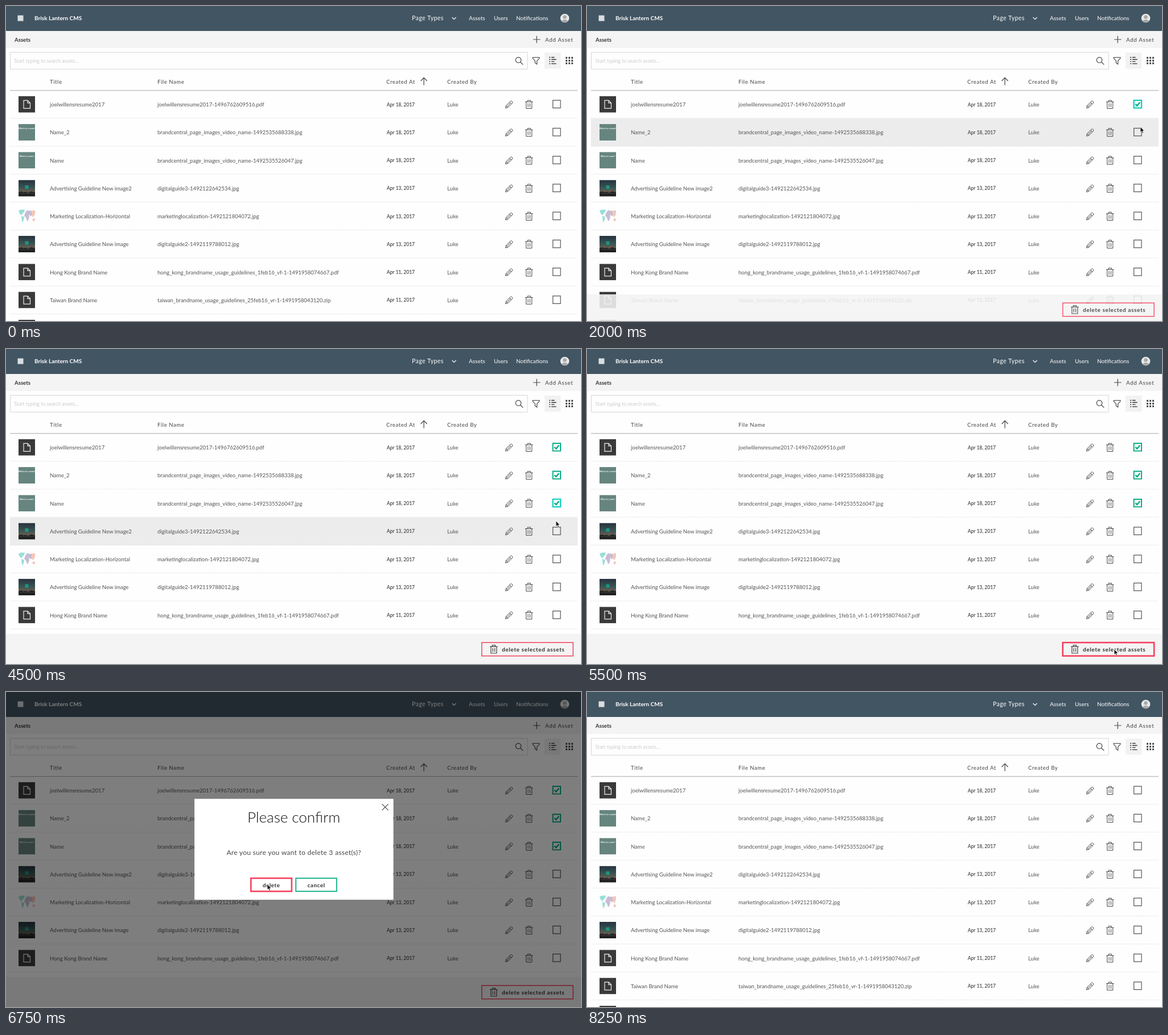
An HTML page for the animation above (9000 ms loop, 1010 by 555 pixels).

```html
<!DOCTYPE html>
<html lang="en">
<head>
<meta charset="utf-8">
<title>Assets</title>
<style>
html, body { margin: 0; width: 100%; height: 100%; overflow: hidden; background: #fefefe; }
svg { display: block; width: 1010px; height: 555px; font: 9.5px Lato, sans-serif; fill: #444; }
.line { fill: none; stroke: #444; stroke-width: 1.2; }
.thin { stroke-width: 1; }
.nav { font-size: 10px; fill: #fff; }
.wide { letter-spacing: .6px; }
.bold { font-weight: 700; fill: #333; }
.row { fill: #555; }
.date { font-size: 8.5px; font-weight: 600; fill: #444; }
.btn { font-size: 10px; letter-spacing: .45px; }
.red { fill: none; stroke: #f5405c; }
.green { fill: none; stroke: #01a982; }
.hover { fill: none; }
.hover.on { fill: #ececec; }
.box { fill: none; stroke: #555; stroke-width: 1.2; }
.tick { fill: none; stroke: #01a982; stroke-width: 2.4; display: none; }
.checked .box { stroke: #01a982; stroke-width: 1.9; }
.checked.focus .box { stroke: #16cfc0; stroke-width: 2.3; }
.checked .tick { display: inline; }
</style>
</head>
<body>
<svg viewBox="0 0 1010 555">
  <defs>
    <linearGradient id="night" x2="0" y2="1">
      <stop offset="0" stop-color="#27323f"/>
      <stop offset=".4" stop-color="#35504f"/>
      <stop offset=".6" stop-color="#4d5a52"/>
      <stop offset=".72" stop-color="#5b5048"/>
      <stop offset="1" stop-color="#25282b"/>
    </linearGradient>
    <clipPath id="frame"><path d="M0 0h29v29H0z"/></clipPath>
    <clipPath id="face"><circle cx="981.5" cy="21.5" r="7.8"/></clipPath>
    <g id="trash">
      <path d="M-6.8-4.7H6.8M-2.6-4.7V-7.2H2.6V-4.7M-5-4.7V7H5V-4.7M-1.7-2V4.5M1.7-2V4.5"/>
    </g>
    <g id="pencil">
      <path d="M-6.3 6.6l1-4.2 7.7-7.8q1.3-1.2 2.5 0l.7.7q1.2 1.2 0 2.5l-7.7 7.7zM.8-3.8l3.2 3.2M-5.3 2.4l3.1 3.1M-3.4 3.7L2.5-2.2"/>
    </g>
    <g id="doc">
      <path fill="#3a3a3a" d="M0 0h29v29H0z"/>
      <path fill="none" stroke="#eee" stroke-width="1.2" d="M9 7.5h7l4.5 4.5v9.5H9zM16 7.5V12h4.5"/>
    </g>
    <g id="city">
      <path fill="url(#night)" d="M0 0h29v29H0z"/>
      <path fill="#1f2224" d="M0 22l5-2 3 2 5-1 4 2 5-3 7 2v7H0z"/>
      <path fill="none" stroke="#a98c6d" stroke-width=".8" stroke-dasharray="1 2" d="M0 19.5h29M2 23.5h25"/>
      <path fill="#1c9482" d="M11.5 9.5h6v6h-6z"/>
    </g>
    <g id="map">
      <path fill="#fdfdfd" d="M0 0h29v29H0z"/>
      <path fill="#98dfdb" d="M0 5l4-2 7 0-1 4-3 3-2 3-3-3zM5 14l5 2-1 5-2 5-1.5-5z"/>
      <path fill="#c9bdd2" d="M12 8l3-4 4 1 4 0 0 8-2 2-2-3-1 2 1 2-2 6-2 1-2-6-3-3z"/>
      <path fill="#f4c6ba" d="M23 5l6-1v6l-2 5-2 1-2-3zM24 20l4-2 1 4-3 2z"/>
    </g>
    <g id="plate"><path fill="#66857f" d="M0 0h29v29H0z"/></g>
  </defs>

  <path fill="#fefefe" d="M0 0h1010v555H0z"/>
  <g id="list">
    <g class="wide">
      <text x="77" y="137.3">Title</text>
      <text x="266" y="137.3">File Name</text>
      <text x="668" y="137.3">Created At</text>
      <text x="775" y="137.3">Created By</text>
    </g>
    <path class="line" d="M734 139.5v-13M728.5 132l5.5-5.6 5.5 5.6"/>
    <g id="rows"></g>
    <path stroke="#c4c4c4" stroke-width="1.4" d="M7 148.7h997"/>
  </g>
  <text id="loading" x="506" y="175" text-anchor="middle" font-size="12.3" letter-spacing=".3">Loading</text>

  <path fill="#425563" d="M0 0h1010v44H0z"/>
  <path fill="#d9dee1" d="M20.5 16.5h10v10h-10z"/>
  <g class="nav">
    <text x="50" y="25" font-weight="700">Brisk Lantern CMS</text>
    <text x="713" y="25" font-size="10.5" letter-spacing=".45">Page Types</text>
    <text x="813" y="25">Assets</text>
    <text x="857" y="25">Users</text>
    <text x="896" y="25">Notifications</text>
  </g>
  <path fill="none" stroke="#fff" stroke-width="1.2" d="M783.5 20l3.5 3.5 3.5-3.5"/>
  <g clip-path="url(#face)">
    <path fill="#e9e9e9" d="M973 13h17v17h-17z"/>
    <circle cx="981.5" cy="19.5" r="3.3" fill="#a9a9a9"/>
    <ellipse cx="981.5" cy="29" rx="6.4" ry="5" fill="#a9a9a9"/>
  </g>
  <path fill="#f4f4f4" d="M0 44h1010v30H0z"/>
  <text class="bold" x="15" y="62.6" font-size="9.6">Assets</text>
  <path class="line" d="M926 59h12.5M932.2 52.8v12.5"/>
  <text x="947" y="62.6" font-size="9.8" letter-spacing=".65">Add Asset</text>
  <path fill="none" stroke="#d6d6d6" d="M7.5 81.5h908.5v29.7H7.5z"/>
  <text x="14.5" y="100" font-size="8.7" fill="#ccc">Start typing to search assets...</text>
  <circle class="line" cx="900" cy="95.2" r="4.8"/>
  <path class="line" d="M903.5 98.8l4.8 4.6"/>
  <path class="line" d="M925.2 90.5h11.6v1.6l-4.2 4.6v5.8l-3.2-2v-3.8l-4.2-4.6z"/>
  <path fill="#f2f2f2" d="M946 82h28.5v28.5H946z"/>
  <path fill="none" stroke="#333" stroke-width="1.4" d="M954 90.5h2.2M958 90.5h5.5M954 94.2h2.2M958 94.2h8.5M954 97.9h2.2M958 97.9h5.5M954 101.6h2.2M958 101.6h8.5"/>
  <path fill="none" stroke="#444" stroke-width="3" stroke-dasharray="3 2" d="M983 91.3h13M983 96.2h13M983 101.1h13"/>

  <g id="footer">
    <path fill="#f4f4f4" d="M0 502h1010v60H0z"/>
    <rect id="remove" class="red" x="835.7" y="517.2" width="160.4" height="23.6"/>
    <use href="#trash" class="line" x="856.8" y="529"/>
    <text class="bold btn" x="871" y="532.5" style="letter-spacing:.6px">delete selected assets</text>
  </g>

  <g id="modal">
    <path fill-opacity=".5" fill="#000" d="M0 0h1010v555H0z"/>
    <path fill="#fff" d="M331 188.3h349.5V366H331z"/>
    <path class="line" d="M660.5 197.3l11 11m0-11l-11 11"/>
    <text x="505.5" y="230" text-anchor="middle" font-size="26" font-weight="300" fill="#111">Please confirm</text>
    <text x="505.7" y="286.8" text-anchor="middle" font-size="12" letter-spacing=".29">Are you sure you want to delete 3 asset(s)?</text>
    <rect id="yes" class="red" x="430.2" y="328.1" width="71.6" height="23.1"/>
    <rect class="green" stroke-width="1.7" x="509.2" y="328.1" width="71.6" height="23.1"/>
    <text class="bold btn" x="466" y="343.6" text-anchor="middle">delete</text>
    <text class="bold btn" x="545" y="343.6" text-anchor="middle">cancel</text>
  </g>
  <path id="cursor" fill="#111" stroke="#fff" stroke-width=".7" d="M0 0v9.6l2.2-2 1.6 3.6 1.7-.7-1.6-3.5H7z"/>
</svg>
<script>
const LOOP = 9000, TOP = 149, PITCH = 49.25;
const $ = id => document.getElementById(id);

const assets = [
  ['doc', 'joelwillensresume2017', 'joelwillensresume2017-1496762609516.pdf', 18],
  ['plate', 'Name_2', 'brandcentral_page_images_video_name-1492535688338.jpg', 18, 3.7],
  ['plate', 'Name', 'brandcentral_page_images_video_name-1492535526047.jpg', 18, 3.2],
  ['city', 'Advertising Guideline New image2', 'digitalguide3-1492122642534.jpg', 13],
  ['map', 'Marketing Localization-Horizontal', 'marketinglocalization-1492121804072.jpg', 13],
  ['city', 'Advertising Guideline New image', 'digitalguide2-1492119788012.jpg', 13],
  ['doc', 'Hong Kong Brand Name', 'hong_kong_brandname_usage_guidelines_1feb16_vf-1-1491958074667.pdf', 11],
  ['doc', 'Taiwan Brand Name', 'taiwan_brandname_usage_guidelines_25feb16_vr-1-1491958043120.zip', 11],
  ['doc', '', '', 11]
];

const caption = size => size ? `<text x="14.5" y="8.8" text-anchor="middle" font-size="${size}"
  font-weight="700" fill="#fff">What's in a name?</text>` : '';

$('rows').innerHTML = assets.map(([thumb, title, file, day, size], i) => `
  <g class="row" transform="translate(0 ${TOP + PITCH * i})">
    <path class="hover" d="M7 0h997v${PITCH - .5}H7z"/>
    <path stroke="#dedede" stroke-width=".8" stroke-dasharray="2 1" d="M7 ${PITCH - .5}h997"/>
    <g transform="translate(22 9.8)" clip-path="url(#frame)"><use href="#${thumb}"/>${caption(size)}</g>
    <text x="77" y="28">${title}</text>
    <text x="266" y="28">${file}</text>
    <text class="date" x="668.7" y="27.5">Apr ${day}, 2017</text>
    <text x="775" y="28">Luke</text>
    <use href="#pencil" class="line thin" x="883.7" y="24.3"/>
    <use href="#trash" class="line thin" x="918.7" y="24.5"/>
    <path class="box" d="M960.6 17.2h13.4v13.4h-13.4z"/>
    <path class="tick" d="M963.4 23.7l2.8 3 5-6"/>
  </g>`).join('');
const rows = [...document.querySelectorAll('.row')];

// Pointer stops: time, x, y. Each one holds until the next.
const stops = [
  [250, 804, 33], [500, 809, 204], [1000, 925, 186], [1250, 962, 175], [1500, 967, 171],
  [2000, 972, 213], [3250, 967, 259], [3500, 967, 267], [4500, 966, 303], [4750, 961, 362],
  [5000, 949, 432], [5250, 935, 488], [5500, 926, 529], [6250, 700, 440], [6500, 472, 348],
  [6750, 459, 339], [7750, 560, 182], [8000, 740, 4]
];
// When each box is ticked, and when its focus passes on.
const ticks = [[1750, 2750], [2750, 3750], [3750, 5500]];

const show = (id, on) => { $(id).style.display = on ? 'inline' : 'none'; };
const between = (t, a, b) => t >= a && t < b;

function draw(now) {
  const t = now % LOOP;
  const visible = between(t, 250, 8250);
  const [, x, y] = stops.filter(s => s[0] <= t).pop() || stops[0];
  const modal = between(t, 5750, 7000), loading = between(t, 7000, 7500);
  const inside = (l, top, r, b) => x > l && x < r && y > top && y < b;

  show('cursor', visible);
  $('cursor').setAttribute('transform', `translate(${x} ${y})`);
  show('list', !loading);
  show('loading', loading);
  show('modal', modal);

  show('footer', between(t, 2000, 7000));
  const rising = t < 2250;
  $('footer').setAttribute('opacity', rising ? .88 : 1);
  $('footer').setAttribute('transform', `translate(0 ${rising ? 6 : 0})`);
  $('remove').setAttribute('stroke-width', inside(835, 517, 996, 541) ? 2.6 : 1.5);
  $('yes').setAttribute('stroke-width', inside(430, 328, 502, 352) ? 2.6 : 1.7);

  const over = visible && t >= 1000 && !modal && y < 502 ? Math.floor((y - TOP) / PITCH) : -1;
  rows.forEach((row, i) => {
    const [on, blur] = ticks[i] || [LOOP, LOOP];
    row.firstElementChild.classList.toggle('on', i === over);
    row.classList.toggle('checked', between(t, on, 7000));
    row.classList.toggle('focus', between(t, on, blur));
  });
}

function tick(now) {
  draw(now);
  requestAnimationFrame(tick);
}
draw(performance.now());
requestAnimationFrame(tick);
</script>
</body>
</html>
```
